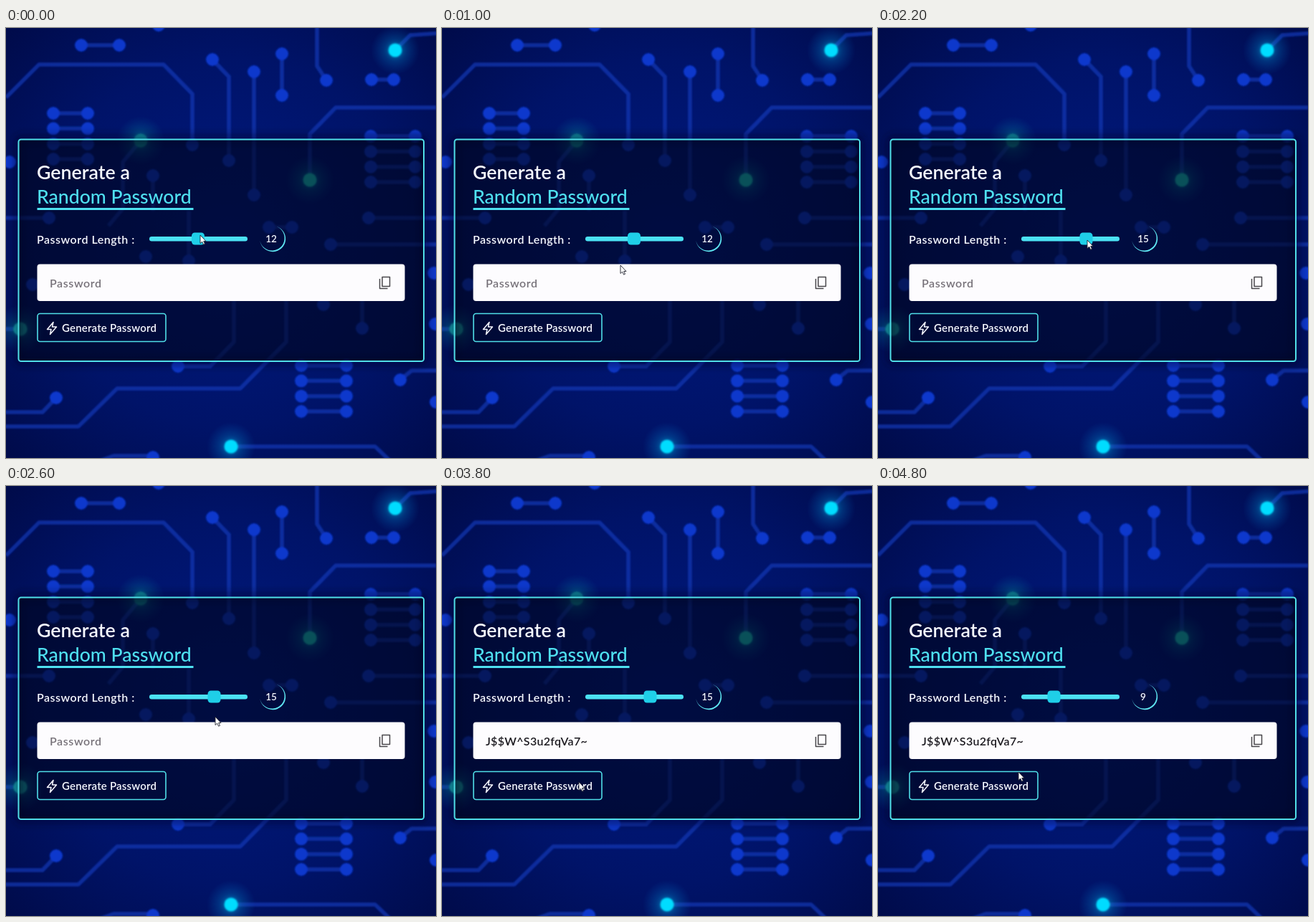
Recreate the animation shown at these times as an HTML page. Size 600 px wide and 600 px high, loop 5 s.

```html
<!DOCTYPE html>
<html lang="en">
<head>
<meta charset="utf-8">
<title>Random password generator</title>
<style>
html, body { margin: 0; height: 100%; overflow: hidden; background: #000e55; }
svg { display: block; width: 100vw; height: 100vh; }
text { font-family: Lato, "Open Sans", sans-serif; font-weight: 600; fill: #f6f8ff; white-space: pre; }
.wire { fill: none; stroke: #1038b4; stroke-width: 5.5; stroke-linejoin: round; opacity: .72; }
.dots { fill: none; stroke: #0837cc; stroke-width: 18; stroke-linecap: round; }
</style>
</head>
<body>
<svg viewBox="0 0 600 600">
  <defs>
    <radialGradient id="sky" gradientUnits="userSpaceOnUse" cx="310" cy="300" r="430">
      <stop offset="0" stop-color="#001a82"/>
      <stop offset=".6" stop-color="#001368"/>
      <stop offset="1" stop-color="#000b4a"/>
    </radialGradient>
    <radialGradient id="glow">
      <stop offset="0" stop-color="#08b4e8" stop-opacity=".75"/>
      <stop offset=".45" stop-color="#0780c8" stop-opacity=".32"/>
      <stop offset="1" stop-color="#0560c0" stop-opacity="0"/>
    </radialGradient>
    <radialGradient id="teal">
      <stop offset="0" stop-color="#10b0b0" stop-opacity=".7"/>
      <stop offset=".45" stop-color="#0a80a0" stop-opacity=".3"/>
      <stop offset="1" stop-color="#0560a0" stop-opacity="0"/>
    </radialGradient>
    <filter id="soft" x="-10%" y="-10%" width="120%" height="120%"><feGaussianBlur stdDeviation="6"/></filter>
    <filter id="blur" filterUnits="userSpaceOnUse" x="-20" y="-20" width="640" height="640"><feGaussianBlur stdDeviation=".8"/></filter>
  </defs>

  <rect width="600" height="600" fill="url(#sky)"/>
  <g filter="url(#blur)">
    <path class="wire" d="M0 97L46 51H220L260 92V163M288 44L311 68V185M346 61V233M385 36V94
      M434 -5V53L447 73M510 72H541M105 24H158M600 111H460L424 148V212M543 31L564 10L605 7
      M314 584H515L537 605M240 472H285L318 438V365M-5 556H101L155 503H327L391 438V365
      M70 516L51 536H-5M188 157L163 187V252L143 276M205 206V255M60 265H-5M255 325V255
      M453 302H605M506 265H605M367 278H399M20 420H-5M497 419V378M550 491L566 478H605
      M205 597H150L128 605"/>
    <g id="chips"></g>
    <path class="dots" d="M260 163h0M288 44h0M311 68m0 117h0M346 61h0M346 233h0M385 36h0M385 94h0
      M447 73h0M510 72h0M541 72h0M105 24h0M158 24h0M240 472h0M70 516h0M205 206h0M60 265h0M255 325h0
      M195 319h0M37 358h0M443 386h0M497 419h0M453 302h0M506 265h0M367 278h0M399 278h0M5 187h0
      M597 342h0M599 413h0M550 491h0M600 522h0M205 599h0M213 -4h0"/>
    <g id="lights"></g>
  </g>

  <rect x="16" y="154" width="568" height="312" rx="5" fill="none" stroke="#000728" stroke-opacity=".6" stroke-width="9" filter="url(#soft)"/>
  <rect x="17.5" y="155.5" width="565.5" height="309.5" rx="3.5" fill="#000418" fill-opacity=".6" stroke="#50dfe8" stroke-width="2"/>

  <text x="43" y="211" font-size="26.8">Generate a</text>
  <text x="43" y="245" font-size="26.6" style="fill:#4fe0f0;font-weight:500">Random Password</text>
  <rect x="43.500" y="251" width="218" height="3" fill="#4fe0f0"/>

  <text x="43" y="301" font-size="16" letter-spacing=".5">Password Length :</text>
  <rect x="200" y="291" width="137" height="6.500" rx="3.200" fill="#4be2f3"/>
  <rect id="thumb" x="-9" y="285.500" width="18" height="17" rx="4.500" fill="#1fcfe8"/>
  <path d="M376 276.600A18 18 0 1 1 354.400 297A17.300 17.300 0 1 0 376 276.600" fill="#5fe6f2"/>
  <text id="count" x="370" y="299" font-size="13.500" text-anchor="middle"></text>

  <rect x="43.500" y="329.500" width="513" height="51.500" rx="4" fill="#fdfcfe"/>
  <text id="field" x="61" y="362" font-size="16"></text>
  <path d="M525 347.500H535.500V360.500H525ZM521.500 350V363.500H532.500" fill="none" stroke="#4a474c" stroke-width="1.500" stroke-linejoin="round"/>

  <rect x="44" y="398.500" width="179" height="39" rx="3.500" fill="none" stroke="#50dfe8" stroke-width="1.600"/>
  <path d="M66 410.500L57.500 420.500H63L61.500 427.500L70.500 417H64.500Z" fill="none" stroke="#f6f8ff" stroke-width="1.500" stroke-linejoin="round"/>
  <text x="78" y="424" font-size="15" letter-spacing=".2">Generate Password</text>

  <path id="cursor" d="M0 0V11.500L2.700 9.200L4.600 13.200L6.500 12.300L4.700 8.500H8Z" fill="#fff" stroke="#20222e" stroke-width=".9"/>
</svg>
<script>
const $ = id => document.getElementById(id);

// Rows of short links with a node at each end: left, right, first y, last y
$('chips').innerHTML = [[66, 114, 119, 183], [509, 571, 151, 215], [412, 475, 471, 535]].map(([l, r, top, end]) =>
  [0, 1, 2, 3].map(i => {
    const y = top + (end - top) * i / 3;
    return `<path class="wire" d="M${l} ${y}H${r}"/><path class="dots" d="M${l} ${y}h0M${r} ${y}h0"/>`;
  }).join('')).join('');

$('lights').innerHTML = [
  [543, 31, 'glow', '#06dcff'], [314, 584, 'glow', '#06dcff'],
  [188, 157, 'teal', '#0d9aa6'], [424, 212, 'teal', '#14c4bd'], [20, 420, 'teal', '#12b4b8']
].map(([x, y, halo, fill]) =>
  `<circle cx="${x}" cy="${y}" r="34" fill="url(#${halo})"/><circle cx="${x}" cy="${y}" r="9.5" fill="${fill}"/>`).join('');

// Keys: time, then values
const pointer = [[0, 271, 289], [400, 268, 296], [1000, 249, 331], [1200, 268, 296], [1600, 330, 296],
  [1800, 330, 296], [2200, 292, 296], [2600, 292, 322], [3400, 191, 413], [3800, 191, 413],
  [4200, 255, 317], [4400, 290, 295], [4600, 246, 296], [4800, 196, 399]];
const slider = [[0, 12], [1200, 12], [1600, 20], [1800, 20], [2200, 15], [4400, 15], [4600, 9]];

function at(keys, t) {
  const i = keys.findIndex(k => k[0] > t);
  if (i < 0) return keys.at(-1).slice(1);
  const [a, b] = [keys[i - 1], keys[i]];
  const p = (t - a[0]) / (b[0] - a[0]);
  return a.slice(1).map((v, n) => v + (b[n + 1] - v) * p);
}

function draw(now) {
  const t = Math.floor(now % 5000 / 200) * 200;
  const length = Math.round(at(slider, t)[0]);
  const made = t >= 3600;
  $('thumb').setAttribute('transform', `translate(${268 + (length - 12) * 7.5})`);
  $('count').textContent = length;
  $('field').textContent = made ? 'J$$W^S3u2fqVa7~' : 'Password';
  $('field').style.fill = made ? '#1c1a20' : '#777279';
  $('field').setAttribute('letter-spacing', made ? .3 : .6);
  $('cursor').setAttribute('transform', `translate(${at(pointer, t)})`);
  requestAnimationFrame(draw);
}
requestAnimationFrame(draw);
</script>
</body>
</html>
```
